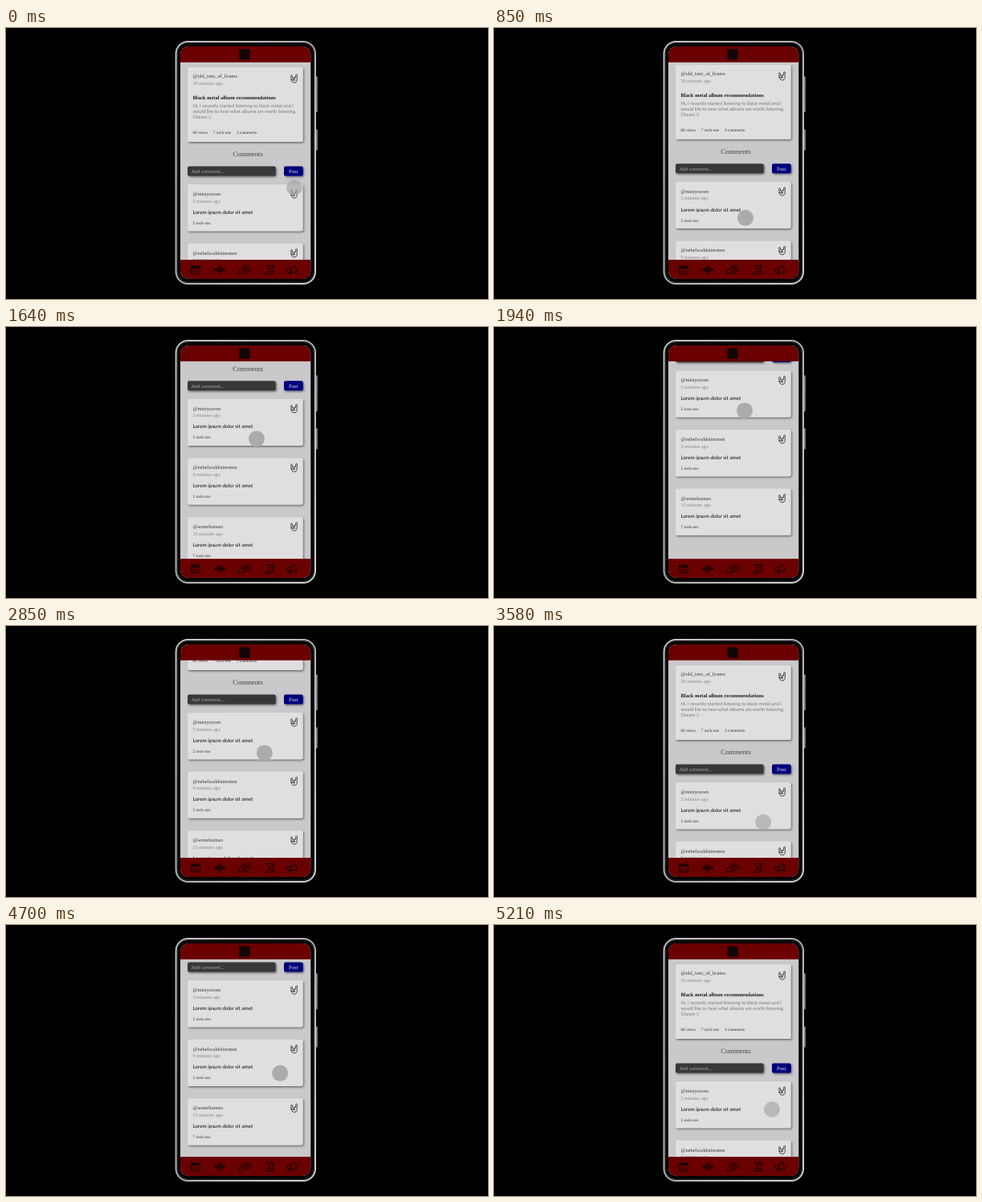
Recreate the animation shown at these times as an HTML page. Size 600x338 px, loop 5240 ms.

```html
<!DOCTYPE html>
<html lang="en">
<head>
<meta charset="utf-8">
<title>Forum scroll</title>
<style>
  html, body { margin: 0; width: 100%; height: 100%; overflow: hidden; background: #000; }
  svg { display: block; width: 100%; height: 100%; }
  text { font-family: "Liberation Serif", serif; fill: #333; text-rendering: geometricPrecision; }
  .user { font-size: 6.5px; fill: #3c3b3d; }
  .time { font-size: 6.1px; fill: #858386; }
  .title { font-size: 6.5px; font-weight: bold; fill: #1d1c1e; }
  .body, .reply, .hint { font-family: Lato, sans-serif; }
  .body { font-size: 5.8px; fill: #79777a; }
  .reply { font-size: 6.3px; fill: #0c0c0c; }
  .hint { font-size: 5.8px; fill: #a3a3a3; }
  .stat { font-size: 5.2px; fill: #2c2b2d; }
  .heading { font-size: 8.7px; fill: #454446; text-anchor: middle; }
  .post { font-size: 6.6px; fill: #e4e4ee; text-anchor: middle; }
  .line { fill: none; stroke: #140000; stroke-width: 1; stroke-linecap: round; stroke-linejoin: round; }
</style>
</head>
<body>
<svg viewBox="0 0 600 338" preserveAspectRatio="xMidYMid meet">
  <defs>
    <linearGradient id="metal" x1="0" y1="0" x2="1" y2="1">
      <stop offset="0" stop-color="#c4c4c6"/>
      <stop offset=".5" stop-color="#b0b0b3"/>
      <stop offset="1" stop-color="#d0d0d2"/>
    </linearGradient>
    <filter id="shadow" x="-10%" y="-20%" width="125%" height="150%">
      <feDropShadow dx="1.2" dy="1.4" stdDeviation=".8" flood-color="#000" flood-opacity=".5"/>
    </filter>
    <clipPath id="screen"><rect x="217" y="23" width="162.5" height="290" rx="10"/></clipPath>
    <g id="horns" fill="none" stroke="#1a1a1a" stroke-width=".75" stroke-linejoin="round" stroke-linecap="round">
      <path d="M-3.5 1.5 L-3.9 -3.6 Q-3.4 -4.7 -2.4 -3.7 L-1.8 -.6 Q-.9 -1.6 0 -.7 Q1 -1.6 1.9 -.7 L2.2 -4.8 Q3 -5.8 3.8 -4.7 L3.6 2.6 Q3 5.3 0 5.3 Q-3 5 -3.5 1.5Z"/>
      <path d="M0 -.7 V.9 M-3 1.4 Q-.4 .8 1.2 1.8 Q.4 2.7 -.8 2.5"/>
    </g>
  </defs>

  <rect width="600" height="338"/>
  <path d="M386.9 61 V104.5 M386.9 127 V152" stroke="#a2a2a5" stroke-width="1.5" stroke-linecap="round"/>
  <rect x="211.6" y="17" width="173.4" height="302" rx="15" fill="#050505" stroke="url(#metal)" stroke-width="2"/>
  <rect x="213.4" y="18.8" width="169.8" height="298.4" rx="13.5" fill="none" stroke="#3a3a3c" stroke-width=".8"/>

  <g clip-path="url(#screen)">
    <rect x="217" y="22" width="162.5" height="293" fill="#cac8cb"/>
    <g id="page"></g>
    <rect x="217" y="22" width="162.5" height="20.8" fill="#6a0000"/>
    <rect x="290.5" y="26.5" width="13" height="13" fill="#110608"/>
    <rect x="217" y="289.1" width="162.5" height="26" fill="#6a0000"/>
    <g class="line">
      <g transform="translate(236 301.5)">
        <rect x="-5.5" y="-4.2" width="11" height="9.4" rx="1"/>
        <path d="M-5.2 -3 H5.2 M-5.2 -1.8 H5.2 M-3 -5.5 V-3 M0 -5.5 V-3 M3 -5.5 V-3 M-3 1 V3.5 M0 1 V3.5 M3 1 V3.5"/>
      </g>
      <path transform="translate(266 301.5)" stroke-width="1.4" d="M-7 0 H-5 M-4 -1.5 V1.5 M-2 -3 V3 M0 -5.2 V5.2 M2 -3 V3 M4 -1.5 V1.5 M5 0 H7"/>
      <g transform="translate(297 301.5)">
        <path d="M-3 -1 Q-3 -5 2.5 -5 Q8 -5 8 -1 Q8 2 4.5 2 L3 4 L2 2 Q-3 2 -3 -1Z M-3.5 -1 Q-8 0 -7 3 L-7.5 5.5 L-4.5 4.5 Q-1 5 1 3 M0 -2.5 H5 M0 -.5 H5"/>
      </g>
      <g transform="translate(328 301.5)">
        <path d="M-4 -5 H5.5 L3.5 2.5 M-2.5 -4.5 L1 0 L-5.5 5.5 H3 Q5.5 5 4.5 2.5 H0 M-3 3.5 L4 -3.5"/>
      </g>
      <g transform="translate(356 301.5)">
        <path d="M-5.5 -1.2 L-1.5 -2 L4 -5.5 L5.5 4 L-1 2.5 L-5 3Z M-4 3 L-2.5 6 L-.8 5.6 L-1.6 2.7 M-1.5 -2 L-1 2.5 M6.3 -1.6 L6.6 .2"/>
      </g>
    </g>
  </g>
  <circle id="pointer" r="10" fill="#a8a8a8"/>
</svg>
<script>
const LOOP = 5240;
const page = document.getElementById("page");
const pointer = document.getElementById("pointer");

const label = (kind, x, y, content) => `<text class="${kind}" x="${x}" y="${y}">${content}</text>`;
const card = (y, height) =>
  `<rect x="226" y="${y}" width="143.6" height="${height}" rx="2" fill="#e0dee1" filter="url(#shadow)"/>
   <use href="#horns" x="358.6" y="${y + (height > 60 ? 14 : 12)}"/>`;
const field = (x, width, color) =>
  `<rect x="${x}" y="172.5" width="${width}" height="12" rx="2" fill="${color}" filter="url(#shadow)"/>`;

const reply = (user, age, rocks, index) => {
  const y = 195 + index * 73.6;
  return card(y, 58.2) +
    label("user", 232.5, y + 14, user) +
    label("time", 232.5, y + 22.6, age + " minutes ago") +
    label("reply", 232.5, y + 36.7, "Lorem ipsum dolor sit amet") +
    label("stat", 232.5, y + 49.7, rocks + " rock-ons");
};

page.innerHTML =
  card(49, 93) +
  label("user", 232.5, 62, "@old_tom_of_brams") +
  label("time", 232.5, 71.2, "30 minutes ago") +
  label("title", 232.5, 88.8, "Black metal album recommendations") +
  ["Hi, I recently started listening to black metal and I",
   "would like to hear what albums are worth listening.",
   "Cheers :)"].map((row, i) => label("body", 232.5, 98.7 + i * 7.2, row)).join("") +
  label("stat", 232.5, 132.2, "60 views") +
  label("stat", 258, 132.2, "7 rock-ons") +
  label("stat", 287, 132.2, "3 comments") +
  label("heading", 301, 160.2, "Comments") +
  field(226, 109.7, "#38373a") + label("hint", 231, 180.9, "Add comment....") +
  field(346, 23.7, "#00007a") + label("post", 357.8, 181, "Post") +
  [["@mistyraven", 5, 2], ["@nebelwaldstimmen", 9, 2], ["@somehuman", 15, 7]]
    .map((entry, i) => reply(...entry, i)).join("");

const linear = p => p;
const smooth = p => p * p * (3 - 2 * p);
const easeOut = p => 1 - (1 - p) ** 2;

// Each key: time, value(s), easing of the segment leading to it.
const pointerKeys = [
  [0, [359, 199]], [30, [359, 199]], [420, [313, 252], smooth], [725, [313, 252]],
  [850, [313, 237]], [1330, [312, 176]], [1940, [312, 104.5]], [2200, [312, 94], easeOut],
  [2400, [312, 94]], [3400, [335, 245], smooth], [3950, [336, 244]],
  [4230, [338, 155], smooth], [4550, [338, 155]], [4900, [346, 230], smooth], [LOOP, [346, 230]]
];
const scrollKeys = [
  [0, [0]], [810, [0]], [850, [3]], [1000, [26]], [1330, [68.5]], [1940, [140.5]], [2020, [145], easeOut],
  [2440, [145]], [3390, [0], smooth], [3990, [0]], [4420, [145], smooth],
  [4560, [145]], [5180, [0], smooth], [LOOP, [0]]
];
const presses = [[620, 2260], [2370, 3450], [3950, 4250], [4550, 4900]];

function sample(keys, t) {
  const next = Math.max(1, keys.findIndex(key => key[0] > t));
  const [t0, from] = keys[next - 1];
  const [t1, to, ease = linear] = keys[next];
  const p = ease((t - t0) / (t1 - t0));
  return from.map((value, i) => value + (to[i] - value) * p);
}

const clamp = value => Math.min(1, Math.max(0, value));
const pressure = t => Math.max(...presses.map(([down, up]) =>
  Math.min(clamp((t - down) / 90), clamp((up - t) / 90 + 1))));

function draw(t) {
  const [x, y] = sample(pointerKeys, t);
  const [scroll] = sample(scrollKeys, t);
  page.setAttribute("transform", `translate(0 ${-scroll})`);
  pointer.setAttribute("transform", `translate(${x} ${y})`);
  pointer.setAttribute("fill-opacity", 0.68 + 0.27 * pressure(t));
}

const start = performance.now();
function tick() {
  draw((performance.now() - start) % LOOP);
  requestAnimationFrame(tick);
}
tick();
</script>
</body>
</html>
```
